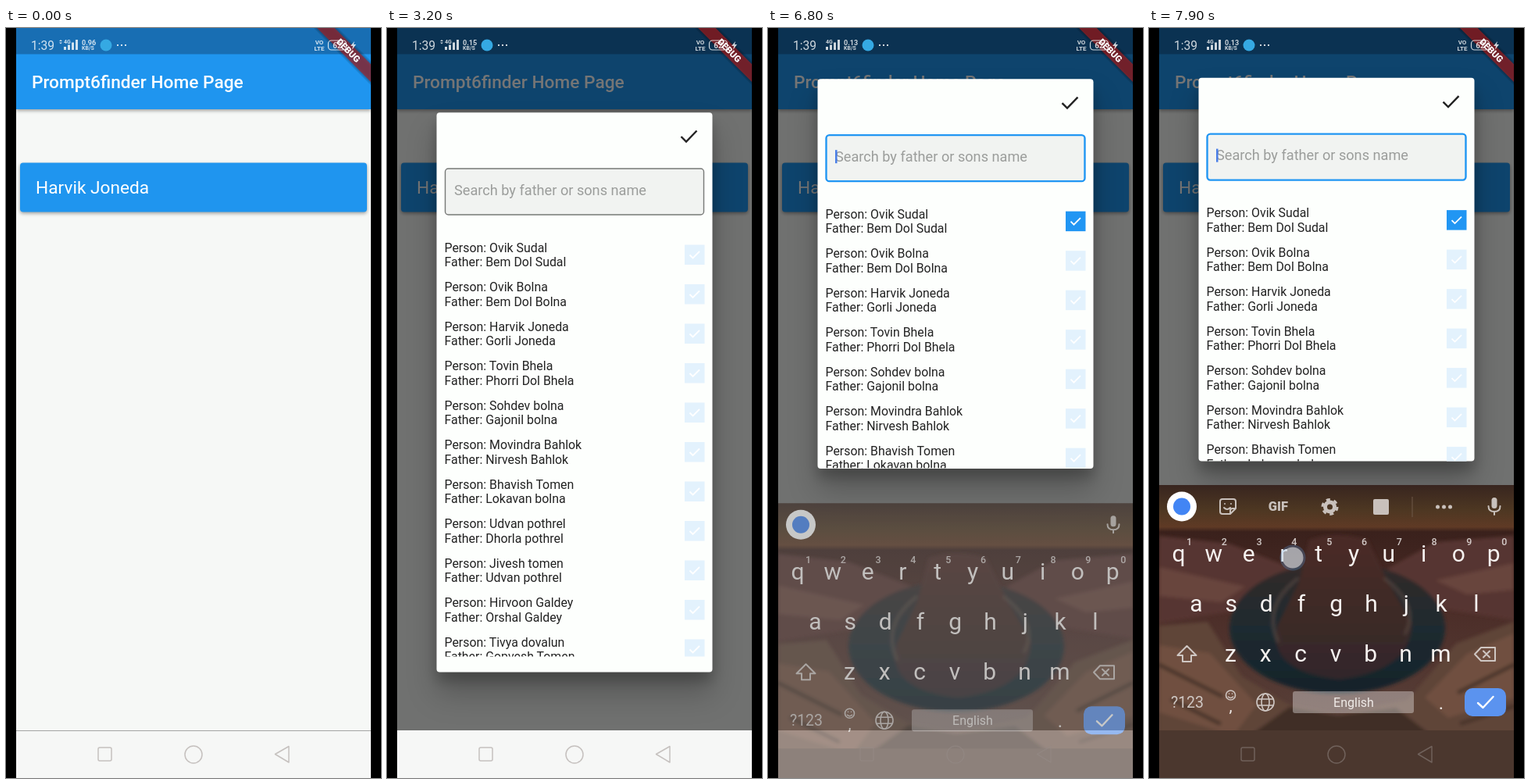
Recreate the animation shown at these times as an HTML page. Size 480 by 960 pixels, loop 8 s.

```html
<!DOCTYPE html>
<html lang="en">
<head>
<meta charset="utf-8">
<title>Search dialog</title>
<style>
html, body { margin: 0; height: 100%; overflow: hidden; background: #000; }
svg { display: block; width: 100vw; height: 100vh; font-family: Roboto, sans-serif; }
.line { fill: none; stroke-linecap: round; stroke-linejoin: round; }
.card { filter: drop-shadow(0 2px 2px rgba(0,0,0,.35)); }
.sheet { filter: drop-shadow(0 11px 8px rgba(0,0,0,.2)) drop-shadow(0 24px 18px rgba(0,0,0,.24)); }
.mid { text-anchor: middle; }
</style>
</head>
<body>
<svg viewBox="0 0 480 960">
  <defs>
    <clipPath id="phone"><rect x="13" width="454" height="960"/></clipPath>
    <clipPath id="photo"><rect x="13" y="585" width="454" height="315"/></clipPath>
    <clipPath id="listClip"><rect id="listBox" x="64" y="250" width="352"/></clipPath>
    <linearGradient id="canyon" x1="0" y1="0" x2="0" y2="1">
      <stop offset="0" stop-color="#38251f"/><stop offset=".1" stop-color="#4d3722"/>
      <stop offset=".17" stop-color="#5f3a25"/><stop offset=".19" stop-color="#3a211c"/>
      <stop offset=".45" stop-color="#4a2b26"/><stop offset="1" stop-color="#59413a"/>
    </linearGradient>
    <linearGradient id="river" x1="0" y1="0" x2="0" y2="1">
      <stop offset="0" stop-color="#332a29"/><stop offset=".5" stop-color="#1f2a30"/>
      <stop offset="1" stop-color="#14232b"/>
    </linearGradient>
    <linearGradient id="butte" x1="0" y1="0" x2="0" y2="1">
      <stop offset="0" stop-color="#4b2b25"/><stop offset="1" stop-color="#32282a"/>
    </linearGradient>
    <filter id="soft"><feGaussianBlur stdDeviation="2"/></filter>
  </defs>

  <g clip-path="url(#phone)">
    <!-- home page -->
    <rect x="13" width="454" height="960" fill="#f6f8f6"/>
    <g class="card">
      <rect x="13" width="454" height="104" fill="#1f95ef"/>
    </g>
    <rect x="13" width="454" height="33.5" fill="#186eb3"/>
    <text x="33" y="77" font-size="22.7" font-weight="500" fill="#fff">Prompt6finder Home Page</text>
    <rect class="card" x="18" y="172.5" width="444" height="63" rx="4" fill="#1f95ef"/>
    <text x="38" y="212" font-size="22.7" fill="#fff">Harvik Joneda</text>

    <!-- dialog -->
    <g id="dialog">
      <rect x="13" width="454" height="899" fill="#000" opacity=".54"/>
      <g id="panel">
        <rect id="sheet" class="sheet" x="63.5" y="108.2" width="353" rx="4" fill="#fdfffd"/>
        <path class="line" d="M376.500 139l6.500 6.500 13.500-14" stroke="#222" stroke-width="2.4" style="stroke-linecap:butt;stroke-linejoin:miter"/>
        <rect id="field" x="74.500" y="180" width="331" height="59" rx="4" fill="#f1f3f1"/>
        <text x="86" y="213.500" font-size="18.16" fill="#9b9d9b">Search by father or sons name</text>
        <rect id="caret" x="86" y="199" width="2.500" height="17" fill="#4a7fe8"/>
        <g clip-path="url(#listClip)"><g id="list" font-size="15.9" fill="#222"></g></g>
      </g>
    </g>

    <!-- debug ribbon -->
    <g transform="translate(438.200 28.800) rotate(45)">
      <rect x="-70" y="-9" width="140" height="18" fill="#000" opacity=".4" filter="url(#soft)"/>
      <rect x="-70" y="-8" width="140" height="16" fill="#b71c1c" opacity=".6"/>
      <text class="mid" y="4" font-size="11.6" font-weight="900" fill="#fff">DEBUG</text>
    </g>

    <!-- status bar -->
    <g fill="#fff" opacity=".8">
      <text x="32" y="28" font-size="15.6">1:39</text>
      <path id="arrows" d="M68 17l2-2 2 2zM68 18.500l2 2 2-2z"/>
      <text x="74" y="20" font-size="7" font-weight="700">4G</text>
      <path d="M74 24h3v4h-3zM79 21.500h3v6.500h-3zM84 18.500h3v9.500h-3zM89 15h3v13h-3z"/>
      <text id="speed" x="97" y="21.500" font-size="9" font-weight="700"></text>
      <text x="97" y="28" font-size="7" font-weight="700">KB/S</text>
      <path d="M142 21h2v2h-2zM147 21h2v2h-2zM152 21h2v2h-2z"/>
      <g class="mid" font-size="8" font-weight="700">
        <text x="401" y="21">VO</text><text x="401" y="28.500">LTE</text>
        <text x="424" y="26" font-size="10">62</text>
      </g>
      <rect class="line" x="412.500" y="16" width="23" height="12" rx="4" stroke="#fff" stroke-width="1.200"/>
      <path d="M446 17l-5 6h3l-1 5 5-7h-3z"/>
    </g>
    <circle cx="128" cy="22" r="7.500" fill="#35a9e3"/>

    <!-- system navigation and keyboard -->
    <rect x="13" y="899" width="454" height="61" fill="#f6f7f6"/>
    <path id="divider" d="M13 899.500h454" stroke="#a4a5a4"/>
    <g id="keyboard">
      <rect x="13" y="585" width="454" height="315" fill="url(#canyon)"/>
      <g clip-path="url(#photo)"><g filter="url(#soft)">
        <path d="M13 650l90 10 82 32-50 50-122 20zM467 650l-100 8-62 34 60 50 102 16z" fill="#573630"/>
        <path d="M13 690l110 25-30 20-80-8zM467 685l-100 22 40 18 60-6z" fill="#68453c"/>
        <ellipse cx="241" cy="768" rx="138" ry="84" fill="url(#river)"/>
        <path d="M205 655q35-12 75 0l26 55 30 50q2 62-92 74-92-10-80-68l28-56z" fill="url(#butte)"/>
        <path class="line" d="M190 705q-45 35-25 80M302 705q45 35 26 70" stroke="#5c4b45" stroke-width="4" opacity=".6"/>
        <path d="M13 765l62-5 44 70 60 36 62 12 90-18 62-72 74-28v145H13z" fill="#5f4438"/>
        <path d="M13 790l65 10 60 66-30 40-95-30zM467 775l-60 26-54 56 30 26 84-25z" fill="#6f5040"/>
        <path d="M130 905l50-36 61 11 75-10 45 35z" fill="#3f2d27"/>
        <path class="line" d="M13 815l80 40M30 860l60 30M467 815l-70 35M400 890l67-22" stroke="#4a342b" stroke-width="5"/>
      </g></g>
      <rect x="13" y="899" width="454" height="80" fill="#4b372e"/>
      <circle cx="42" cy="612.500" r="19" fill="#fff"/>
      <circle cx="42" cy="612.500" r="11" fill="#4285f4"/>
      <g id="tools" fill="#c9c1bc">
        <path class="line" d="M94 603h14q3 0 3 3v9l-7 7h-10q-3 0-3-3v-13q0-3 3-3M111 615h-4q-3 0-3 3v4M96 614q4 4 8 0M97 609v.1M105 609v.1" stroke="#c9c1bc" stroke-width="2"/>
        <text class="mid" x="165.500" y="618" font-size="16.500" font-weight="900">GIF</text>
        <circle class="line" cx="231.500" cy="613" r="6" stroke="#c9c1bc" stroke-width="5"/>
        <circle class="line" cx="231.500" cy="613" r="9.500" stroke="#c9c1bc" stroke-width="3" style="stroke-linecap:butt" stroke-dasharray="5 4.950"/>
        <rect x="287" y="603" width="20" height="20" rx="2"/>
        <path d="M337 600v26" stroke="#6f5948"/>
        <circle cx="369.500" cy="613" r="2.500"/><circle cx="377.500" cy="613" r="2.500"/><circle cx="385.500" cy="613" r="2.500"/>
      </g>
      <rect x="438.500" y="601" width="7" height="14" rx="3.500" fill="#c9c1bc"/>
      <path class="line" d="M434.500 612q0 7 7.500 7t7.500-7M442 619v4" stroke="#c9c1bc" stroke-width="2"/>
      <g id="keys" class="mid" fill="#f5f1ef" font-size="30"></g>
      <g class="line" stroke="#cfc7c3" stroke-width="2">
        <path d="M48.500 791l-12 12h6.500v8h11v-8h6.500z"/>
        <path d="M425 793h18v17h-18l-8-8.500zM428 797.500l8 8M436 797.500l-8 8"/>
        <g stroke-width="1.600">
          <circle cx="104.500" cy="854" r="6"/><path d="M101.500 856q3 3 6 0M102.500 852v.1M106.500 852v.1"/>
          <circle cx="149" cy="863" r="11"/><ellipse cx="149" cy="863" rx="5" ry="11"/>
          <path d="M139 859h20M139 867h20"/>
        </g>
      </g>
      <rect x="184" y="849" width="155" height="28" rx="3" fill="#fff" opacity=".35"/>
      <g class="mid" fill="#f0ebe8">
        <text x="49" y="870" font-size="19.500" fill="#cfc7c3">?123</text>
        <text x="104.500" y="875" font-size="21">,</text>
        <text x="262" y="869" font-size="16">English</text>
        <text x="374" y="872" font-size="24">.</text>
      </g>
      <rect x="404" y="845" width="53" height="36" rx="10" fill="#5b93ef"/>
      <path class="line" d="M421 864l6.500 6 13-14" stroke="#fff" stroke-width="2.400"/>
    </g>
    <g class="line" stroke="#968c87" stroke-opacity=".5" stroke-width="1.500">
      <rect x="118" y="921" width="17" height="17" rx="2"/>
      <circle cx="240" cy="930" r="11"/>
      <path d="M362 919.500v20.500l-17.500-10.500z"/>
    </g>
    <g id="touch">
      <circle r="16.500" fill="#5aa8f0" opacity=".25"/>
      <circle r="13.500" fill="#e6e4e2" opacity=".6"/>
    </g>
  </g>
</svg>
<script>
const $ = id => document.getElementById(id);
const set = (id, attrs) => { for (const k in attrs) $(id).setAttribute(k, attrs[k]); };
const show = (id, on) => set(id, { visibility: on ? 'visible' : 'hidden' });
const clamp = x => Math.max(0, Math.min(1, x));
const easeOut = x => 1 - (1 - clamp(x)) ** 3;
const text = (x, y, s, extra = '') => `<text x="${x}" y="${y}" ${extra}>${s}</text>`;

const people = [
  ['Ovik Sudal', 'Bem Dol Sudal'], ['Ovik Bolna', 'Bem Dol Bolna'],
  ['Harvik Joneda', 'Gorli Joneda'], ['Tovin Bhela', 'Phorri Dol Bhela'],
  ['Sohdev bolna', 'Gajonil bolna'], ['Movindra Bahlok', 'Nirvesh Bahlok'],
  ['Bhavish Tomen', 'Lokavan bolna'], ['Udvan pothrel', 'Dhorla pothrel'],
  ['Jivesh tomen', 'Udvan pothrel'], ['Hirvoon Galdey', 'Orshal Galdey'],
  ['Tivya dovalun', 'Gopvesh Tomen']
];
$('list').innerHTML = people.map(([name, father], i) => `<g transform="translate(0 ${i * 50.5})">
  ${text(73.5, 286.5, 'Person: ' + name)}${text(73.5, 305, 'Father: ' + father)}
  <rect id="box${i}" x="381" y="277.5" width="25.5" height="25.5" fill="#e3f2fd"/>
  <path d="M387.500 290.500l4 4 8.500-8.500" fill="none" stroke="#fff" stroke-width="1.800"/></g>`).join('');

const keyRows = [['qwertyuiop', 38, 683], ['asdfghjkl', 60.5, 747], ['zxcvbnm', 104.5, 811]];
$('keys').innerHTML = keyRows.map(([row, x0, y], r) => [...row].map((c, i) => {
  const x = x0 + i * 44.8;
  const digit = r ? '' : text(x + 13.5, 662, (i + 1) % 10, 'font-size="12.500" font-weight="500" opacity=".8"');
  return text(x, y, c) + digit;
}).join('')).join('');

// start, end, x, y
const touches = [[1000, 1450, 409, 210], [6250, 6550, 240, 208], [7800, 8300, 184, 678]];

function draw(t) {
  const focused = t >= 6600;
  const lift = easeOut((t - 6700) / 150);
  const rise = easeOut((t - 6700) / 373);

  show('dialog', t >= 1880);
  show('divider', t < 1880);
  show('arrows', t < 3800);
  $('speed').textContent = t < 500 ? '0.96' : t < 4750 ? '0.15' : '0.13';

  set('panel', { transform: `translate(0 ${-44.4 * lift})` });
  set('sheet', { height: 716.3 - 225.6 * lift });
  set('listBox', { height: 554.5 - 205.6 * lift });
  set('field', { stroke: focused ? '#2196f3' : '#777977', 'stroke-width': focused ? 2.4 : 1.4 });
  set('caret', { opacity: focused && (t - 6600) % 1000 < 550 ? 1 : 0 });
  set('box0', { fill: t >= 4700 ? '#2196f3' : '#e3f2fd' });

  set('keyboard', { transform: `translate(0 ${60 * (1 - rise)})`, opacity: rise });
  set('tools', { opacity: clamp((t - 7000) / 100) });

  const tap = touches.find(([from, to]) => t >= from && t < to);
  set('touch', tap
    ? { opacity: Math.min(clamp((t - tap[0]) / 80), clamp((tap[1] - t) / 150)), transform: `translate(${tap[2]} ${tap[3]})` }
    : { opacity: 0 });
}

const start = performance.now();
function tick() {
  draw((performance.now() - start) % 8000);
  requestAnimationFrame(tick);
}
tick();
</script>
</body>
</html>
```
